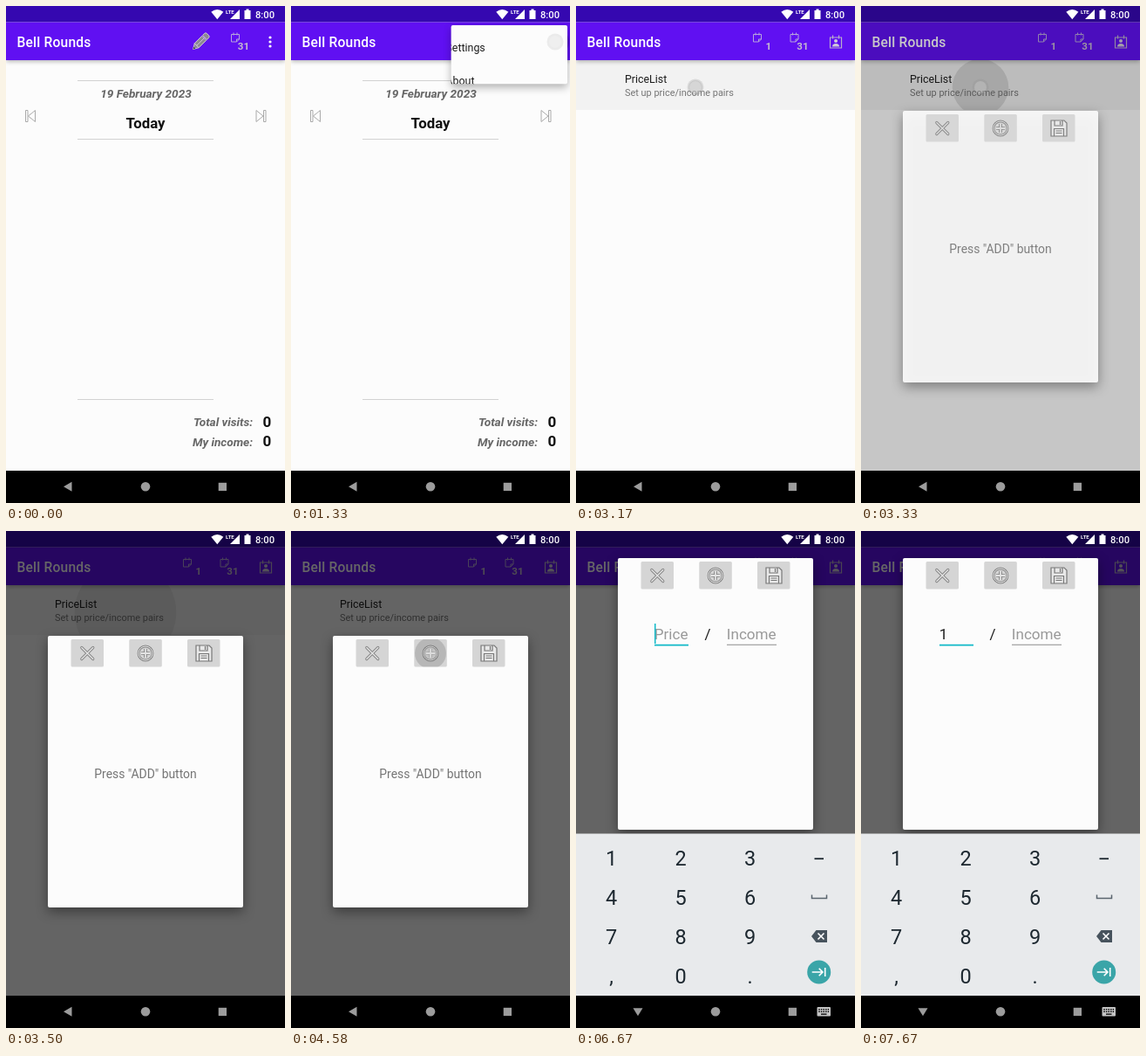
Write an HTML page with a canvas that moves like this. It is 320 px wide and 569 px high and loops after 8 s.

```html
<!DOCTYPE html>
<html lang="en">
<head>
<meta charset="utf-8">
<title>Bell Rounds</title>
<style>
html, body { margin: 0; width: 100%; height: 100%; overflow: hidden; background: #000; }
canvas { display: block; width: 320px; height: 569px; }
</style>
</head>
<body>
<canvas id="stage"></canvas>
<script>
const W = 320, H = 569, LOOP = 8000;
const canvas = document.getElementById('stage');
const dpr = window.devicePixelRatio || 1;
canvas.width = W * dpr;
canvas.height = H * dpr;
const c = canvas.getContext('2d');

const TEAL = '#10b9c8', PAPER = '#fcfcfc', NAV_TOP = 532, KEYS_H = 185.5;

// Finger presses: time, x, y
const taps = [[1080, 303, 41], [2080, 215, 48], [3080, 137, 93],
  [4500, 160, 140], [5500, 115, 207], [7000, 40, 375]];

const ramp = (t, a, b) => Math.min(1, Math.max(0, (t - a) / (b - a)));
const easeOut = p => 1 - (1 - p) ** 3;
const smooth = p => p * p * (3 - 2 * p);

function box(x, y, w, h, color, r = 0) {
  c.fillStyle = color;
  c.beginPath();
  c.roundRect(x, y, w, h, r);
  c.fill();
}
function dot(x, y, r, color) {
  c.fillStyle = color;
  c.beginPath();
  c.arc(x, y, r, 0, 7);
  c.fill();
}
function text(s, x, y, size, color, style = '', align = 'left') {
  c.font = `${style} ${size}px Roboto, sans-serif`;
  c.fillStyle = color;
  c.textAlign = align;
  c.fillText(s, x, y);
}
function fill(d, color, x = 0, y = 0) {
  c.save();
  c.translate(x, y);
  c.fillStyle = color;
  c.fill(new Path2D(d));
  c.restore();
}
function stroke(d, color, x = 0, y = 0, w = 1) {
  c.save();
  c.translate(x, y);
  c.strokeStyle = color;
  c.lineWidth = w;
  c.stroke(new Path2D(d));
  c.restore();
}
function raised(alpha, blur, drop, draw) {
  c.save();
  c.shadowColor = `rgba(0,0,0,${alpha})`;
  c.shadowBlur = blur * dpr;
  c.shadowOffsetY = drop * dpr;
  draw();
  c.restore();
}
function layer(alpha, draw) {
  if (alpha <= 0) return;
  c.save();
  c.globalAlpha = alpha;
  draw();
  c.restore();
}
function ripple(x, y, r, alpha, clip) {
  if (alpha <= 0 || r <= 0) return;
  c.save();
  if (clip) {
    c.beginPath();
    c.rect(...clip);
    c.clip();
  }
  dot(x, y, r, `rgba(0,0,0,${alpha})`);
  c.restore();
}

function calendar(x, day) {
  stroke('M0 2h9v5.5l-3 3h-6zM9 7.5h-3v3M2.5 0v3M6.5 0v3', '#b7a4dc', x + .5, 30.5);
  text(day, x + 21, 50, 11.5, '#c4bacf', 'bold', 'right');
}

function pencil() {
  c.save();
  c.translate(214.5, 49.5);
  c.rotate(-Math.PI / 4);
  for (const d of ['M0 0L6 -3.5V3.5z', 'M6 -3.5H18V3.5H6z', 'M19 -3.5h3q2 0 2 2v3q0 2 -2 2h-3z']) {
    fill(d, '#8d8894');
    stroke(d, '#d2ccd8', 0, 0, .9);
  }
  stroke('M6 0H18', '#d2ccd8', 0, 0, .8);
  fill('M0 0l2.5 -1.5v3z', '#444');
  c.restore();
}

function personCalendar() {
  stroke('M0 2.5h13v12h-13zM3 0v4M10 0v4', '#b9aecb', 291.5, 33.5, 1.2);
  dot(298, 40, 2, '#d0c8da');
  fill('M0 4q0 -3.5 4 -3.5t4 3.5z', '#d0c8da', 294, 42.5);
}

function toolbar(settings, t) {
  box(0, 0, W, 18.5, '#3508b0');
  raised(.3, 5, 2, () => box(0, 18.5, W, 43.5, '#6010f2'));
  c.letterSpacing = '.2px';
  text('Bell Rounds', 12.5, 46.5, 15.6, '#fff', '500');
  c.letterSpacing = '0px';
  if (settings) {
    calendar(203, '1');
    calendar(245.5, '31');
    personCalendar();
    return;
  }
  pencil();
  calendar(258, '31');
  for (const y of [36, 41, 46]) dot(303, y, 1.6, '#fff');
  if (t >= 1080) ripple(303, 41, 8 + 8 * easeOut(ramp(t, 1080, 1300)), .16 * (1 - ramp(t, 1350, 1670)));
}

function home() {
  for (const y of [85, 152, 450]) box(82, y, 156, 1, '#d2d2d2');
  text('19 February 2023', 160.5, 105.3, 13.6, '#666', 'italic bold', 'center');
  text('Today', 160, 139.5, 16.8, '#111', 'bold', 'center');
  const skip = 'M0 0h2.5v13h-2.5zM3 6.5L11 0v13z';
  stroke(skip, '#aaa', 22.5, 119.5);
  c.save();
  c.translate(W, 0);
  c.scale(-1, 1);
  stroke(skip, '#aaa', 22, 119.5);
  c.restore();
  [['Total visits:', 481], ['My income:', 503.5]].forEach(([label, y]) => {
    text(label, 283, y, 13.6, '#666', 'italic bold', 'right');
    text('0', 299.3, y + .5, 17, '#111', 'bold', 'center');
  });
}

function settingsPage(t) {
  if (t >= 3080) {
    const row = [0, 62, W, 57];
    box(...row, `rgba(0,0,0,${.05 * ramp(t, 3080, 3200) * (1 - ramp(t, 3350, 3800))})`);
    ripple(137, 93, (t - 3120) * .153, .11 * (1 - ramp(t, 3330, 3750)), row);
  }
  text('PriceList', 56, 88, 12.4, '#1c1c1c');
  text('Set up price/income pairs', 56, 103, 10.95, '#757575');
}

function menu(t) {
  const open = easeOut(ramp(t, 1230, 1500));
  const alpha = ramp(t, 1230, 1330) * (1 - ramp(t, 2200, 2360));
  layer(alpha, () => {
    const w = 152 * (.5 + .5 * open), h = 89 * open;
    raised(.3, 10, 4, () => box(317 - w, 22, w, h, PAPER, 2));
    c.beginPath();
    c.rect(317 - w, 22, w, h);
    c.clip();
    if (t >= 2080) ripple(215, 48, 200 * ramp(t, 2080, 2300), .1, [165, 29, 152, 37]);
    text('Settings', 177.5, 52, 12.4, '#1c1c1c');
    text('About', 177.5, 89.5, 12.4, '#1c1c1c');
  });
}

function hollow(d, x, y, w) {
  stroke(d, '#858585', x, y, w + 1.8);
  stroke(d, '#e2e2e2', x, y, w);
}

function buttons(t) {
  for (const x of [74.5, 141.3, 208]) box(x, 124, 37.5, 31.5, '#d5d5d5', 1.5);
  if (t >= 4500) ripple(160, 140, 26 * easeOut(ramp(t, 4500, 4750)), .14 * (1 - ramp(t, 4750, 5170)), [141.3, 124, 37.5, 31.5]);
  c.lineCap = 'round';
  hollow('M-6.5 -6.5L6.5 6.5M6.5 -6.5L-6.5 6.5', 93.3, 140, 1.4);
  c.lineCap = 'butt';
  hollow('M8 0A8 8 0 1 1 -8 0A8 8 0 1 1 8 0', 160, 140, 1);
  hollow('M-5 0H5M0 -5V5', 160, 140, 1.8);
  const disk = 'M0 0H15L18 3V18H0z';
  fill(disk, '#e8e8e8', 218, 131);
  stroke(disk, '#777', 218, 131, 1.2);
  stroke('M4 0V6H13V0M10.5 1V5M3.5 18V9.5H14.5V18M5.5 12H12.5M5.5 14.5H12.5', '#777', 218, 131, 1.2);
}

function fields(t) {
  const focused = t >= 5580, typed = t >= 7170;
  text(typed ? '1' : 'Price', 89.7, 213, 17.1, typed ? '#1c1c1c' : '#999');
  text('/', 151, 213, 17.1, '#1c1c1c', '', 'center');
  text('Income', 172.8, 213, 17.1, '#999');
  box(90, 218.7, 39, focused ? 1.8 : 1, focused ? TEAL : '#8c8c8c');
  box(173, 218.8, 57, 1, '#8c8c8c');
  const blink = typed ? t - 7170 : t - 5660 + (t < 5660 ? 80 : 0);
  if (focused && blink % 1000 < 500) box(typed ? 99.3 : 90, 195, 1.5, 23, TEAL);
}

function dialog(t, lift) {
  layer(ramp(t, 3230, 3340), () => {
    c.translate(0, -89 * lift);
    raised(.4, 14, 5, () => box(48, 120, 224, 311, PAPER, 2));
    buttons(t);
    if (t < 4650) text('Press "ADD" button', 160, 282.5, 13.9, '#757575', '', 'center');
    else fields(t);
  });
}

function keyboard(t, shown) {
  if (!shown) return;
  c.save();
  c.beginPath();
  c.rect(0, 0, W, NAV_TOP);
  c.clip();
  c.translate(0, KEYS_H * (1 - shown));
  box(0, NAV_TOP - KEYS_H, W, KEYS_H, '#e8eaec');
  if (t >= 7000) ripple(40, 375, 14, .12 * (1 - ramp(t, 7100, 7330)));
  ['123', '456', '789', ',0.'].forEach((row, j) => [...row].forEach((key, i) =>
    text(key, 40.5 + i * 79.5, 383 + j * 45, 23.5, '#1d2830', '', 'center')));
  box(273.5, 374.3, 10.5, 1.8, '#1d2830');
  stroke('M0 0V4H17V0', '#5a656e', 270.5, 416.5, 1.5);
  fill('M0 7L5.5 0H18V14H5.5z', '#47535d', 270, 457);
  stroke('M7.5 3.5l7 7m0 -7l-7 7', '#fff', 270, 457, 1.6);
  dot(278.7, 505, 13.5, '#3aa5a8');
  stroke('M-8 0H4M0 -4.2L4.2 0L0 4.2M7 -5V5', '#fff', 278.7, 505, 1.6);
  c.restore();
}

function statusIcons() {
  fill('M0 3Q7 -2.5 14 3L7 11.5z', '#fff', 235.3, 3.7);
  text('LTE', 252, 9, 6, '#fff', 'bold');
  fill('M11 0V11H0z', '#fff', 257, 4);
  fill('M0 1.5H2V0H5V1.5H7V11.5H0z', '#fff', 273.5, 3.5);
  text('8:00', 286, 13.5, 11.2, '#fff', '500');
}

function navBar(typing) {
  const grey = '#9c9c9c';
  box(0, NAV_TOP, W, H - NAV_TOP, '#000');
  fill(typing ? 'M-5.5 -4H5.5L0 5z' : 'M-5 0L4.5 -5.5V5.5z', grey, 71, 550.3);
  dot(160, 550.3, 5.3, grey);
  box(243.7, 545.8, 9.3, 9.3, grey);
  if (!typing) return;
  box(276.5, 545, 15.5, 10.5, '#c4c4c4', 1);
  for (let j = 0; j < 2; j++)
    for (let i = 0; i < 5; i++) box(278.3 + i * 2.6, 547 + j * 2.6, 1.4, 1.4, '#000');
  box(281, 552.5, 6.5, 1.3, '#000');
}

function touches(t) {
  for (const [at, x, y] of taps) {
    if (t < at || t > at + 340) continue;
    layer(1 - ramp(t, at + 200, at + 340), () => {
      dot(x, y, 9.5, 'rgba(120,120,120,.2)');
      dot(x, y, 7, 'rgba(255,255,255,.3)');
    });
  }
}

function draw(t) {
  const settings = t >= 2250;
  const shown = smooth(ramp(t, 5790, 6130));
  c.setTransform(dpr, 0, 0, dpr, 0, 0);
  box(0, 0, W, H, PAPER);
  settings ? settingsPage(t) : home();
  toolbar(settings, t);
  menu(t);
  box(0, 0, W, NAV_TOP, `rgba(0,0,0,${.6 * ramp(t, 3250, 3475)})`);
  statusIcons();
  dialog(t, shown);
  keyboard(t, shown);
  navBar(t >= 5720);
  touches(t);
}

const start = performance.now();
function tick() {
  draw((performance.now() - start) % LOOP);
  requestAnimationFrame(tick);
}
tick();
</script>
</body>
</html>
```
